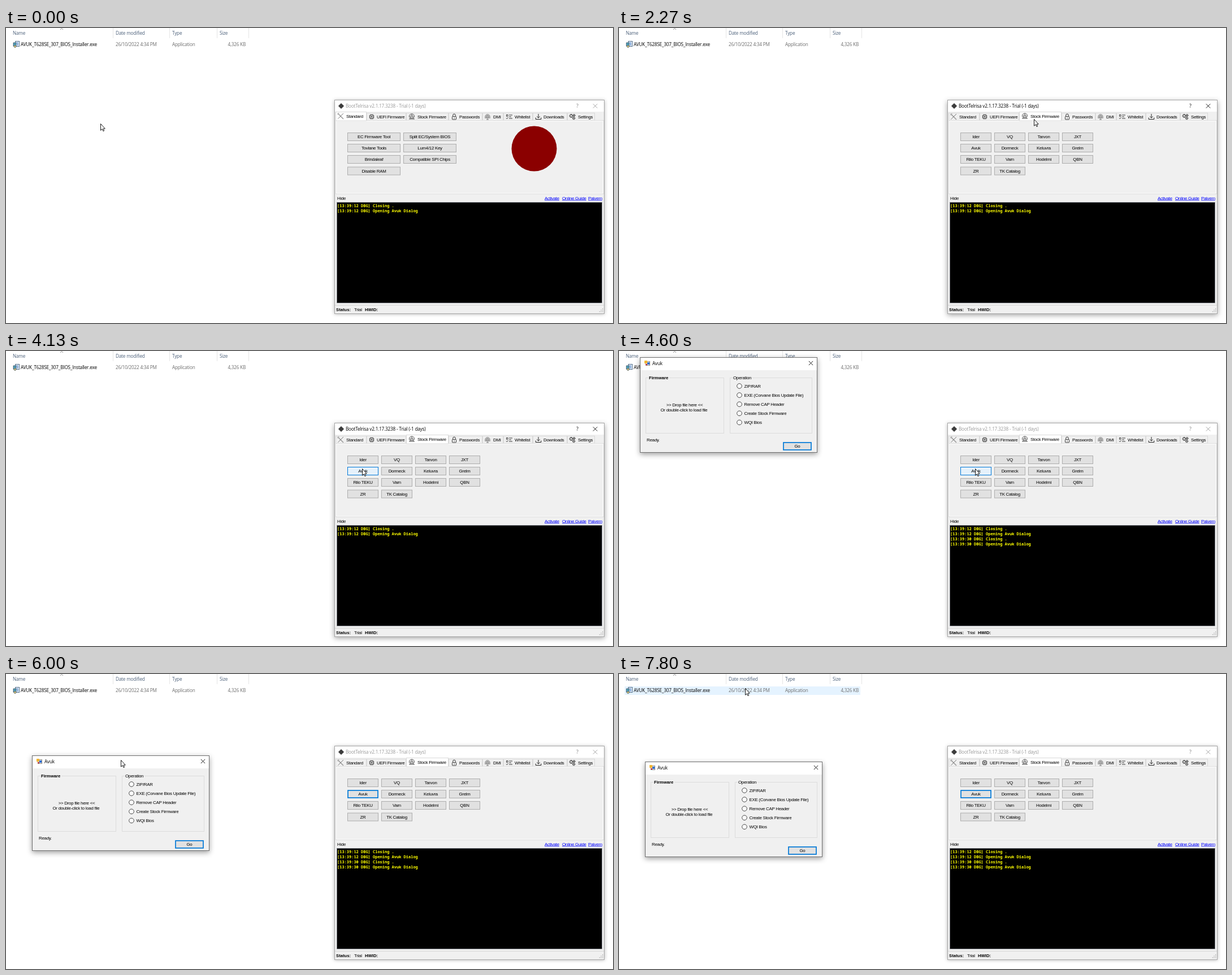
Write an HTML page that moves like this. It is 1074 by 522 pixels and loops after 8 s.

```html
<!DOCTYPE html>
<html lang="en">
<head>
<meta charset="utf-8">
<title>Firmware tool demo</title>
<style>
html, body { margin: 0; width: 100%; height: 100%; overflow: hidden; background: #fff; }
svg { display: block; }
text { white-space: pre; }
.s { font: 7.9px "Liberation Sans", Arial, sans-serif; letter-spacing: -.28px; }
.b { font: bold 7.7px "Liberation Sans", Arial, sans-serif; }
.u { font: 8.2px "Open Sans", "Noto Sans", sans-serif; letter-spacing: -.2px; }
.m { font: 600 7px "Noto Sans Mono", "Liberation Mono", monospace; }
.mid { text-anchor: middle; }
.end { text-anchor: end; }
.link { fill: #00f; text-decoration: underline; }
</style>
</head>
<body>
<svg id="stage" width="1074" height="522" viewBox="0 0 1074 522"></svg>
<script>
const LOOP = 8000, FPS = 15;
const stage = document.getElementById("stage");

function add(parent, tag, attrs = {}, content) {
  const node = document.createElementNS("http://www.w3.org/2000/svg", tag);
  set(node, attrs);
  if (content !== undefined) node.textContent = content;
  parent.appendChild(node);
  return node;
}
function set(node, attrs) {
  for (const key in attrs) node.setAttribute(key, attrs[key]);
}
const group = (parent, x = 0, y = 0) => add(parent, "g", { transform: `translate(${x},${y})` });
const rect = (parent, x, y, width, height, fill, more) =>
  add(parent, "rect", { x, y, width, height, fill, ...more });
const frame = (parent, x, y, w, h, fill, stroke) =>
  rect(parent, x + .5, y + .5, w - 1, h - 1, fill, { stroke });
const path = (parent, d, stroke, width = 1, fill = "none") =>
  add(parent, "path", { d, stroke, "stroke-width": width, fill });
const label = (parent, x, y, str, cls = "s", fill = "#000") =>
  add(parent, "text", { x, y, class: cls, fill }, str);
const cross = (parent, x, y, r, color) =>
  path(parent, `M${x - r},${y - r}l${2 * r},${2 * r}m0,${-2 * r}l${-2 * r},${2 * r}`, color, .9);
const show = (node, on) => set(node, { visibility: on ? "visible" : "hidden" });

// File list
const rowHover = rect(stage, 10, 22, 417, 15, "#e5f3ff");
for (const x of [189, 289, 373, 429]) rect(stage, x, 0, 1, 18, "#e5e5e5");
path(stage, "M96,3l2.5,-2.5l2.5,2.5", "#777", .8);
[[12, "Name"], [194, "Date modified"], [294, "Type"], [378, "Size"]]
  .forEach(([x, s]) => label(stage, x, 12, s, "u", "#4c607a"));
label(stage, 26, 32, "AVUK_T628SE_307_BIOS_Installer.exe", "u");
label(stage, 194, 32, "26/10/2022 4:34 PM", "u", "#6d6d6d");
label(stage, 294, 32, "Application", "u", "#6d6d6d");
label(stage, 424, 32, "4,326 KB", "u end", "#6d6d6d");
const exe = group(stage, 12, 23);
frame(exe, 4, 0, 8, 10, "#fff", "#4a6a8a");
rect(exe, 1, 3, 5, 6, "#4f9fb8", { stroke: "#345", "stroke-width": .7 });
path(exe, "M6,3h4M7,5h3M7,7h3", "#2f6fc0", 1);
add(exe, "circle", { cx: 4, cy: 9.5, r: 2, fill: "#d9c77a", stroke: "#456", "stroke-width": .7 });

// Main window
const shadow = rect(stage, 581, 127, 478, 378, "#f0f0f0");
frame(stage, 581, 127, 478, 379, "#f0f0f0", "#a6a6a6");
rect(stage, 582, 128, 476, 20, "#fff");
rect(stage, -3.6, -3.6, 7.2, 7.2, "#3c3c3c", { transform: "translate(593,138) rotate(45)" });
const title = label(stage, 601, 141, "BootTelrisa v2.1.17.3238 - Trial (-1 days)", "u");
const help = label(stage, 1011, 141.2, "?", "u mid");
const close = cross(stage, 1042.5, 138, 3.7, "#000");
frame(stage, 583, 163, 475, 131, "#fff", "#dcdcdc");
rect(stage, 585, 165, 471, 127, "#f0f0f0");

const icons = {
  tools: g => {
    path(g, "M-4,-4L5,5", "#999", 1.5);
    path(g, "M5,-5L-4,4", "#777", 1);
    path(g, "M-5,-2.5V-5H-2.5M-5,5l2,-2", "#999", 1);
  },
  chip: g => {
    path(g, "M-2,-4.5V4.5M0,-4.5V4.5M2,-4.5V4.5M-4.5,-2H4.5M-4.5,0H4.5M-4.5,2H4.5", "#444", .7);
    rect(g, -3, -3, 6, 6, "#f4f4f4", { rx: 1, stroke: "#222" });
    rect(g, -1.2, -1.2, 2.4, 2.4, "#444");
  },
  stock: g => {
    path(g, "M-4.5,1V-1A4.5,4 0 0 1 4.5,-1V1M-5,4H-3V1H3V4H5M0,-5V-3", "#333", .8);
    rect(g, -2.2, -2, 4.4, 4.4, "#fff", { rx: 1, stroke: "#222", "stroke-width": .8 });
    path(g, "M-1,0H1M-2,5V3M0,5V3M2,5V3", "#222", .8);
  },
  lock: g => {
    path(g, "M-2.3,-.5V-2.6a2.3,2.3 0 0 1 4.6,0V-.5", "#222", .9);
    rect(g, -3.5, -.5, 7, 5.4, "#f6f6f6", { rx: .8, stroke: "#222", "stroke-width": .9 });
    path(g, "M0,1.2V3.2", "#222", .9);
  },
  print: g => {
    for (const r of [1.2, 2.7, 4.2])
      path(g, `M${-r},3V0a${r},${r} 0 0 1 ${2 * r},0V3`, "#666", .8);
    path(g, "M0,0V5M-2,5H2", "#666", .8);
  },
  list: g => {
    rect(g, -4.6, -3.4, 2.6, 2.6, "none", { stroke: "#222", "stroke-width": .8 });
    path(g, "M-5,2.2l1.3,1.5l2.2,-2.6M0,-3H6M0,0H4M0,3H6", "#222", .9);
  },
  load: g => path(g, "M0,-5V2M-2.7,-.6L0,2.2L2.7,-.6M-4.8,1.5V4.5H4.8V1.5", "#222", 1),
  gears: g => [[-2, -1.5, 2.4], [3.2, -2.4, 1.4], [2.6, 2.6, 1.7]].forEach(([cx, cy, r]) => {
    add(g, "circle", { cx, cy, r: r + .6, fill: "none", stroke: "#222", "stroke-dasharray": "1 .8" });
    add(g, "circle", { cx, cy, r: r - .3, fill: "none", stroke: "#222", "stroke-width": .9 });
  })
};
const tabs = [
  [583, 638, 592, 602, "Standard", "tools"], [638, 708, 647, 656, "UEFI Firmware", "chip"],
  [708, 783, 718, 728, "Stock Firmware", "stock"], [783, 843, 793, 802, "Passwords", "lock"],
  [843, 880, 852, 862, "DMI", "print"], [880, 932, 890, 900, "Whitelist", "list"],
  [932, 993, 942, 951, "Downloads", "load"], [993, 1042, 1002, 1012, "Settings", "gears"]
].map(([x, end, iconX, textX, name, icon]) => {
  const back = frame(stage, x, 150, end - x, 14, "#f0f0f0", "#d9d9d9");
  const face = group(stage);
  icons[icon](group(face, iconX, 157));
  label(face, textX, 160, name);
  return { box: [x, 150, end - x, 14], back, face };
});

const rowY = [185, 205, 225, 245.5];
function button(parent, x, y, w, h, name) {
  const back = rect(parent, x + .5, y + .5, w - 1, h - 1, "#e1e1e1", { stroke: "#adadad" });
  label(parent, x + w / 2, y + h / 2 + 2.8, name, "s mid");
  return { box: [x, y, w, h], back };
}
function buttonPage(columns, w, step) {
  const page = group(stage);
  const items = columns.flatMap((names, c) =>
    names.map((name, r) => button(page, 604 + c * step, rowY[r], w, 15, name)));
  return { page, items };
}
const standard = buttonPage([
  ["EC Firmware Tool", "Tovlane Tools", "Brindaleaf", "Disable RAM"],
  ["Split EC/System BIOS", "Lum4/12 Key", "Compatible SPI Chips"]
], 94, 99);
add(standard.page, "circle", { cx: 934.5, cy: 213.5, r: 40, fill: "#8b0000" });
const vendors = buttonPage([
  ["Ider", "Avuk", "Rilo TEKU", "ZR"], ["VQ", "Dormeck", "Varn", "TK Catalog"],
  ["Tarvon", "Keluvra", "Hodelmi"], ["JXT", "Grelm", "QBN"]
], 55, 60);
const picked = vendors.items[1];

label(stage, 586, 303.5, "Hide");
[[953, "Activate"], [984, "Online Guide"], [1030, "Palvern"]]
  .forEach(([x, s]) => label(stage, x, 303.5, s, "s link"));
rect(stage, 585.5, 308.5, 469, 178, "#000", { stroke: "#828790", "stroke-width": .7 });
const log = ["12 DBG] Closing .", "12 DBG] Opening Avuk Dialog", "30 DBG] Closing .", "30 DBG] Opening Avuk Dialog"]
  .map((s, i) => label(stage, 586, 317 + i * 9, "[13:39:" + s, "m", "#ff0"));
rect(stage, 582, 490, 476, 1, "#d7d7d7");
label(stage, 584, 501, "Status:", "b");
label(stage, 616, 501, "Trial");
label(stage, 635, 501, "HWID:", "b");
for (let i = 0; i < 3; i++)
  for (let j = 0; j <= i; j++) rect(stage, 1055 - j * 2.6, 496 + i * 2.6, 1.3, 1.3, "#aaa");

// Dialog, drawn from its own corner
const dialog = group(stage);
rect(dialog, 0, 0, 314, 169, "#f0f0f0", { style: "filter:drop-shadow(0 3px 5px rgba(0,0,0,.38))" });
frame(dialog, 0, 0, 314, 169, "#f0f0f0", "#6f6f6f");
rect(dialog, 1, 1, 312, 22, "#fff");
frame(dialog, 10, 7, 8, 8, "#f4f4f4", "#888");
rect(dialog, 8, 6, 5, 5, "#f2b632");
rect(dialog, 13, 9, 4, 4, "#2f6fd0");
rect(dialog, 10, 12, 3, 2, "#c33");
label(dialog, 22, 14, "Avuk", "u");
cross(dialog, 302.5, 10.5, 3.6, "#000");
frame(dialog, 10, 36, 139, 99, "none", "#dcdcdc");
frame(dialog, 159, 36, 146, 99, "none", "#dcdcdc");
rect(dialog, 15, 34, 37, 5, "#f0f0f0");
rect(dialog, 164, 34, 34, 5, "#f0f0f0");
label(dialog, 16, 39.3, "Firmware", "b");
label(dialog, 165, 39.3, "Operation");
["ZIP/RAR", "EXE (Corvane Bios Update File)", "Remove CAP Header", "Create Stock Firmware", "WQI Bios"]
  .forEach((s, i) => {
    const y = 51 + i * 16.1;
    add(dialog, "circle", { cx: 176, cy: y, r: 4.3, fill: "#fff", stroke: "#333", "stroke-width": .9 });
    label(dialog, 184.5, y + 2.8, s);
  });
label(dialog, 79, 86.8, ">> Drop file here <<", "s mid");
label(dialog, 78, 95.6, "Or double-click to load file", "s mid");
label(dialog, 12, 149.3, "Ready.");
const go = button(dialog, 253, 150, 51, 15, "Go");
set(go.back, { x: 254, y: 151, width: 49, height: 13, stroke: "#0078d7", "stroke-width": 1.7 });

const cursor = group(stage);
path(cursor, "M.5,.5V12.2L3.2,9.7L5,13.6L6.7,12.8L5,9.1H8.3Z", "#000", .9, "#fff");

// Pointer track: tick, x, y
const track = [
  [10, 167, 169], [11, 176, 168], [13, 250, 158], [16, 440, 141], [18, 580, 139],
  [20, 690, 149], [22, 738, 159], [24, 744, 160], [32, 744, 160], [33, 743, 157],
  [36, 715, 168], [40, 655, 200], [43, 636, 208], [45, 633, 209], [49, 633, 209],
  [50, 600, 195], [51, 564, 165], [52, 605, 139], [53, 700, 155], [54, 780, 215],
  [55, 820, 262], [56, 852, 242], [57, 863, 224], [61, 863, 224], [62, 630, 208],
  [70, 630, 208], [72, 500, 150], [74, 260, 35], [75, 206, 18], [76, 194, 15],
  [80, 195, 17], [84, 200, 40], [85, 201, 57], [86, 205, 84], [87, 204, 116],
  [88, 203, 144], [90, 203, 152], [93, 203, 159], [100, 203, 159], [102, 203, 167],
  [104, 200, 145], [107, 188, 85], [110, 179, 35], [112, 177, 25], [113, 181, 25],
  [115, 207, 25], [117, 223, 25]
];
function pointer(tick) {
  const next = track.findIndex(p => p[0] > tick);
  if (next < 1) return (next ? track[track.length - 1] : track[0]).slice(1);
  const [t0, x0, y0] = track[next - 1], [t1, x1, y1] = track[next];
  const k = (tick - t0) / (t1 - t0);
  return [x0 + (x1 - x0) * k, y0 + (y1 - y0) * k];
}
const inside = ([px, py], [x, y, w, h]) => px >= x && px < x + w && py >= y && py < y + h;

const ACTIVATE = 26, SWITCH = 27, OPEN = 64, GRAB = 77;

function paintButton(item, hover, focus) {
  const [x, y, w, h] = item.box, thick = focus && !hover, inset = thick ? 1 : .5;
  set(item.back, {
    x: x + inset, y: y + inset, width: w - 2 * inset, height: h - 2 * inset,
    fill: hover ? "#e5f1fb" : "#e1e1e1",
    stroke: hover || focus ? "#0078d7" : "#adadad",
    "stroke-width": thick ? 1.7 : 1
  });
}

function draw(tick) {
  const tip = pointer(tick);
  const active = tick >= ACTIVATE && tick < OPEN;
  const opened = tick >= OPEN, switched = tick >= SWITCH;
  set(cursor, { transform: `translate(${tip.map(Math.round)})` });
  show(rowHover, tick > 100 && inside(tip, [10, 22, 417, 15]));

  set(shadow, { style: `filter:drop-shadow(0 ${active ? "3px 5px rgba(0,0,0,.38" : "1px 3px rgba(0,0,0,.3"}))` });
  set(title, { fill: active ? "#000" : "#999" });
  set(help, { fill: active ? "#000" : "#777" });
  set(close, { stroke: active ? "#000" : "#999" });

  tabs.forEach((tab, i) => {
    const on = i === (switched ? 2 : 0);
    set(tab.back, {
      y: on ? 148.5 : 150.5, height: on ? 15.5 : 13,
      fill: on ? "#fff" : inside(tip, tab.box) ? "#d8eaf6" : "#f0f0f0"
    });
    set(tab.face, { transform: `translate(0,${on ? -1 : 0})` });
  });
  show(standard.page, !switched);
  show(vendors.page, switched);
  for (const item of vendors.items)
    paintButton(item, inside(tip, item.box), item === picked && opened);
  log.forEach((line, i) => show(line, i < 2 || opened));

  show(dialog, opened);
  const [hx, hy] = pointer(Math.min(tick - 1, 94));
  const x = tick < GRAB ? 37 : Math.round(hx - 157), y = tick < GRAB ? 11 : Math.round(hy - 4);
  const grow = Math.max(0, Math.min(1, (tick - OPEN + 1) / 4));
  const scale = .9 + .1 * grow;
  set(dialog, {
    opacity: grow,
    transform: `translate(${x + 157 * (1 - scale)},${y + 84.5 * (1 - scale)}) scale(${scale})`
  });
}

const start = performance.now();
function loop() {
  const time = (performance.now() - start) % LOOP;
  draw(Math.floor((time + 4) * FPS / 1000));
  requestAnimationFrame(loop);
}
loop();
</script>
</body>
</html>
```
